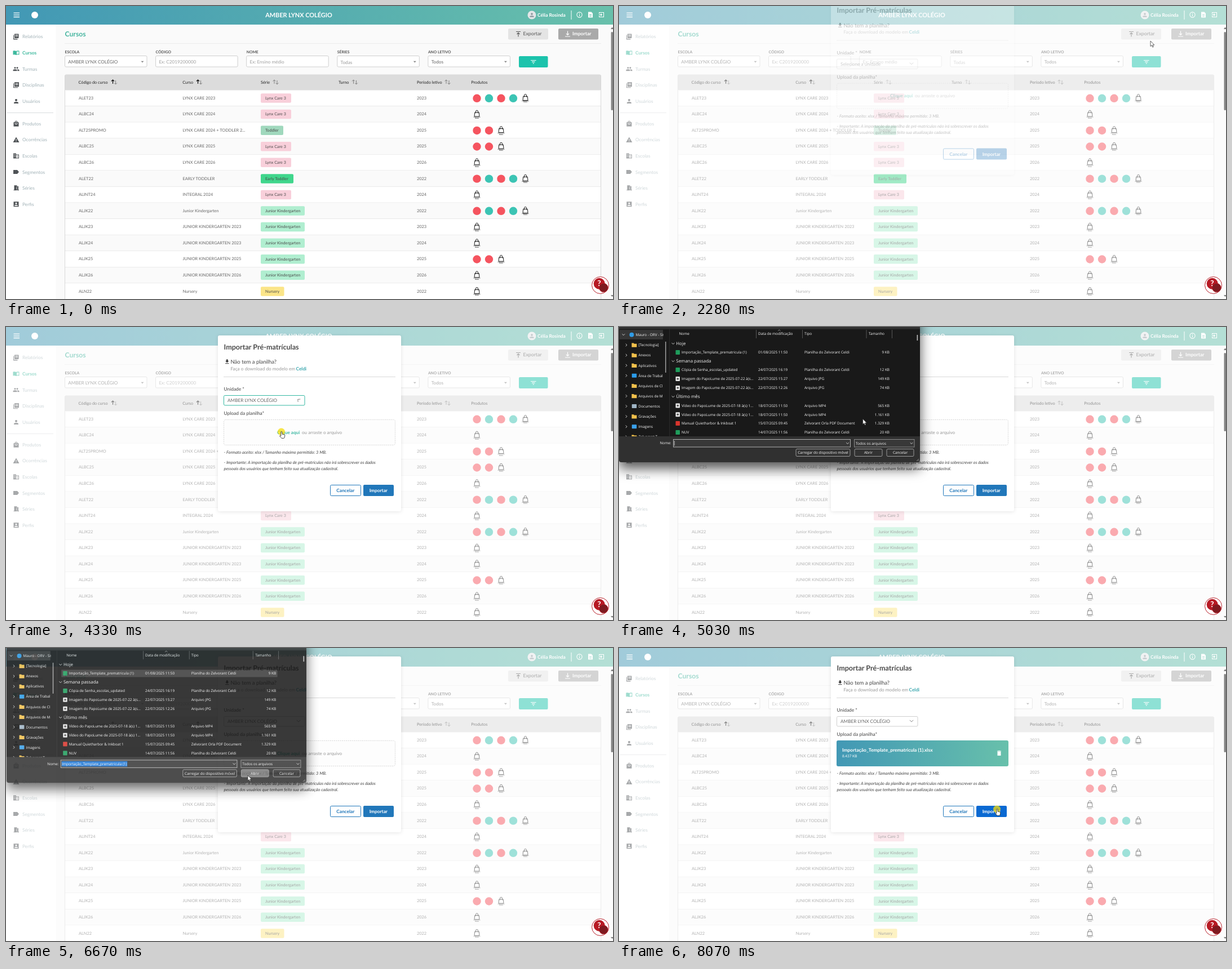
Write an HTML page that moves like this. It is 1077 by 520 pixels and loops after 8.13 s.

```html
<!DOCTYPE html>
<html lang="pt-BR">
<head>
<meta charset="utf-8">
<title>Importar</title>
<style>
html, body { margin: 0; width: 100%; height: 100%; overflow: hidden; background: #fafafa; }
svg { display: block; width: 1077px; height: 520px; }
text { font-family: Lato, "Open Sans", sans-serif; white-space: pre; text-rendering: geometricPrecision; }
#dialog text { font-family: "Open Sans", "Noto Sans", sans-serif; }
#modal { filter: drop-shadow(0 1px 3px rgba(0,0,0,.1)); }
#dialog { filter: drop-shadow(0 11px 11px rgba(0,0,0,.68)); }
</style>
</head>
<body>
<svg id="stage" viewBox="0 0 1077 520"></svg>
<script>
const LOOP = 8130;
const SCHOOL = 'AMBER LYNX COLÉGIO';
const FILE = 'Importação_Template_prematricula (1)';
const PICK = 'Selecione a unidade';

// Drawing helpers: text is placed by the middle of its capitals.
const text = (x, y, s, size, fill, extra = '') =>
  `<text x="${x}" y="${(y + size * .36).toFixed(2)}" font-size="${size}" fill="${fill}" ${extra}>${s}</text>`;
const BOLD = 'font-weight="700"', MID = 'text-anchor="middle"', END = 'text-anchor="end"', ITALIC = 'font-style="italic"';
const rect = (x, y, w, h, fill, extra = '') =>
  `<rect x="${x}" y="${y}" width="${w}" height="${h}" fill="${fill}" ${extra}/>`;
const circle = (x, y, r, fill, extra = '') => `<circle cx="${x}" cy="${y}" r="${r}" fill="${fill}" ${extra}/>`;
const line = (d, stroke, width = 1, extra = '') =>
  `<path d="${d}" fill="none" stroke="${stroke}" stroke-width="${width}" ${extra}/>`;
const group = (id, body, extra = '') => `<g id="${id}" ${extra}>${body}</g>`;
const at = (x, y, body, scale = 1) => `<g transform="translate(${x} ${y}) scale(${scale})">${body}</g>`;

// Icons live in a 24-unit box.
const ICONS = {
  report: 'M6 2h15v15H6zM9 5v2h9V5zM9 9v2h9V9zM2 6h2v13h13v3H2z',
  book: 'M1 5q6-2 11 1v14q-5-3-11-1zM12 6q5-3 11-1v14q-6-2-11 1zM14 8v9q4-1 7-1V7q-4 0-7 1z',
  people: 'M8 5a3 3 0 1 0 .01 0zM16 5a3 3 0 1 0 .01 0zM1 19v-2.500q0-3.500 7-3.500t7 3.500V19zM17 19v-3l-2-3q8 0 8 3.500V19z',
  layers: 'M6 2h16v16H6zM9 6v2h10V6zM9 10v2h10v-2zM2 6h2v14h14v2H2z',
  person: 'M12 4a4 4 0 1 0 .01 0zM4 20v-2q0-4 8-4t8 4v2z',
  bag: 'M3 7h4q0-5 5-5t5 5h4v15H3zM9 7h6q0-3-3-3t-3 3zM7 10q0 5 5 5t5-5h-2q0 3-3 3t-3-3z',
  warn: 'M12 2L1 21h22zM11 9v6h2V9zM11 17v2h2v-2z',
  building: 'M2 3h10v4h10v14H2zM4 6v2h2V6zM8 6v2h2V6zM4 10v2h2v-2zM8 10v2h2v-2zM4 14v2h2v-2zM8 14v2h2v-2zM12 9v10h8V9zM15 11v2h3v-2zM15 15v2h3v-2z',
  tag: 'M2 5h14l6 7-6 7H2z',
  door: 'M5 2h10v18H3v-2h2zM12 11v2h2v-2zM16 5h4v13h2v2h-6z',
  badge: 'M3 3h18v18H3zM12 6a3 3 0 1 0 .01 0zM6 18h12q0-4-6-4t-6 4z',
  file: 'M4 2h11l5 5v15H4zM8 11v2h8v-2zM8 16v2h8v-2z',
  exit: 'M3 3h18v18H3v-6h2v4h14V5H5v4H3zM10 7l5 5-5 5-1.500-1.500 2.500-2.500H3v-2h8L8.500 8.500z',
  trash: 'M6 7h12v14H6zM5 4h4l1-1h4l1 1h4v2H5z',
  down: 'M9 3h6v6h4l-7 7-7-7h4zM5 18h14v2H5z'
};
const icon = (name, x, y, size, fill) =>
  at(x - size / 2, y - size / 2, `<path d="${ICONS[name]}" fill="${fill}" fill-rule="evenodd"/>`, size / 24);
const chevron = (x, y, r, stroke, width = 1) => line(`M${x - r} ${y - r / 2}l${r} ${r}l${r} ${-r}`, stroke, width);
const caret = (x, y) => `<path d="M${x - 2.5} ${y - 1}h5l-2.500 2.700z" fill="#888"/>`;

function header() {
  return rect(0, 0, 1077, 33, 'url(#brand)') +
    line('M13.500 12.300h10.500m-10.500 3.600h10.500m-10.500 3.600h10.500', '#fff', 1.3) +
    circle(51, 16, 6, '#fff') +
    text(519.5, 15.6, SCHOOL, 10.9, '#fff', `${BOLD} ${MID}`) +
    circle(933, 16, 7.5, '#e4e6e8') + icon('person', 933, 16, 11, '#8f9aa0') +
    text(943, 15.6, 'Célia Rosinda', 8.4, '#fff', BOLD) +
    line('M1003 8v16', '#fff') + circle(1017.5, 15.5, 4.6, 'none', 'stroke="#fff" stroke-width="1.1"') +
    line('M1017.500 15v3m0-5.200v1.100', '#fff', 1.1) +
    icon('file', 1037, 15.5, 12, '#fff') + icon('exit', 1056.5, 15.5, 12, '#fff');
}

function sidebar() {
  const items = [['Relatórios', 'report'], ['Cursos', 'book'], ['Turmas', 'people'], ['Disciplinas', 'layers'], ['Usuários', 'person'],
    ['Produtos', 'bag'], ['Ocorrências', 'warn'], ['Escolas', 'building'], ['Segmentos', 'tag'], ['Séries', 'door'], ['Perfis', 'badge']];
  return rect(0, 33, 88.5, 487, '#fff') + line('M2 189.500h82', '#d9dcde') + items.map(([label, name], i) => {
    const y = 54.5 + i * 28.6 + (i > 4 ? 11.3 : 0), on = i === 1;
    return icon(name, 18, y, 12, on ? '#3fb99e' : '#4f5356') +
      text(29, y, label, 8.3, on ? '#3fb99e' : '#a3b3b8', on ? BOLD : '');
  }).join('');
}

function filters() {
  const fields = [['ESCOLA', SCHOOL, 1, '#666'], ['CÓDIGO', 'Ex: C2019200000', 0, '#a0a0a0'],
    ['NOME', 'Ex: Ensino médio', 0, '#a0a0a0'], ['SÉRIES', 'Todas', 1, '#999'], ['ANO LETIVO', 'Todos', 1, '#666']];
  return text(104.5, 49.5, 'Cursos', 12.2, '#45b59f', BOLD) + line('M104 66.500h952', '#ececec') +
    rect(891, 40, 71, 19.5, '#e4e4e4', 'rx="2"') + line('M905 45.500h8m-4 9v-7m-2.500 2.500l2.500-2.500l2.500 2.500', '#555', 1.1) +
    text(917.5, 49.3, 'Exportar', 8.7, '#555') +
    rect(980, 40, 71, 19.5, '#a9a9a9', 'rx="2" id="importTop"') +
    line('M992 54h9m-4.500-9.500v7m-2.500-2.500l2.500 2.500l2.500-2.500', '#fff', 1.2) + text(1005, 49.3, 'Importar', 8.6, '#fff', BOLD) +
    fields.map(([label, value, list, color], i) => {
      const x = 104.5 + i * 161.1;
      return text(x, 81.8, label, 6.8, '#555', BOLD) + rect(x, 88.5, 145.5, 19.5, '#fff', 'rx="2" stroke="#cfcfcf"') +
        text(x + 5.8, i === 3 ? 100 : 98.6, value, 8.2, color) + (list ? caret(x + 137.5, 98.8) : '');
    }).join('') +
    rect(910, 89, 51.5, 20, '#1cc3ac', 'rx="2"') + line('M931 96.500h9.500m-7.500 2.700h5.500m-3.700 2.700h2', '#fff', 1.2);
}

const bagMark = (x, y) => at(x, y,
  line('M-3.800 -3h7.600l.7 7.200h-9zM-2 -1.500v-3.200q0-2 2-2t2 2v3.200', '#1c1c1c', 1) + line('M-6.300 5.300h12.600', '#444', .6) +
  text(0, 7, 'Store', 3, '#222', `${BOLD} ${MID}`));

function table() {
  const chips = {
    L: ['Lynx Care 3', 54, '#f8cfda'], T: ['Toddler', 40, '#a0d8bd'], E: ['Early Toddler', 58, '#40d68c'],
    J: ['Junior Kindergarten', 78, '#b0eed0'], N: ['Nursery', 41.5, '#fbe588']
  };
  const rows = ['ET23|LYNX CARE 2023|L|2023|rgrgb', 'BC24|LYNX CARE 2024|L|2024|b', 'T25PROMO|LYNX CARE 2024 + TODDLER 2...|T|2025|rrb',
    'BC25|LYNX CARE 2025|L|2025|rrb', 'BC26|LYNX CARE 2026|L|2026|b', 'ET22|EARLY TODDLER|E|2022|rgrgb',
    'INT24|INTEGRAL 2024|L|2024|b', 'JK22|Junior Kindergarten|J|2022|rgrgb', 'JK23|JUNIOR KINDERGARTEN 2023|J|2023|b',
    'JK24|JUNIOR KINDERGARTEN 2023|J|2024|b', 'JK25|JUNIOR KINDERGARTEN 2025|J|2025|rrb',
    'JK26|JUNIOR KINDERGARTEN 2026|J|2026|b', 'N22|Nursery|N|2022|b'];
  const heads = [['Código do curso', 128.5, 192], ['Curso', 313.3, 343], ['Série', 452, 478.5], ['Turno', 590, 619],
    ['Período letivo', 729, 783.5], ['Produtos', 825.3]];
  const body = rows.map((row, i) => {
    const [code, course, kind, year, marks] = row.split('|'), y = 163.3 + i * 28.57;
    const [label, width, color] = chips[kind];
    return rect(104.5, y - 14.1, 951, 28.6, i % 2 ? '#fafafa' : '#fff') + line(`M104.500 ${y + 14.5}h951`, '#dadada') +
      text(129, y - .2, 'AL' + code, 7.4, '#666') + text(313.4, y - .2, course, 7.4, '#666') +
      rect(452, y - 8, width, 16.5, color, 'rx="2"') + text(460, y, label, 7.2, '#4a4a4a') +
      text(729, y - .2, year, 7.4, '#666') +
      [...marks].map((m, k) => {
        const x = 835.5 + k * 21.5;
        return m === 'b' ? bagMark(x, y) : circle(x, y + .5, 7.2, m === 'r' ? '#f5545f' : '#3cc4b4');
      }).join('');
  }).join('');
  return body + rect(104.5, 121.5, 951, 28, '#dcdcdc', 'rx="2"') + line('M104.500 123v397m951-397v397', '#d8d8d8') +
    heads.map(([label, x, sort], i) => text(x, 135.2, label, 7.3, '#222') + (sort ? at(sort, 135,
      line('M-2.500 3v-7m-2.500 2.500l2.500-2.500l2.500 2.500', i < 2 ? '#111' : '#777', i < 2 ? 1.2 : .9) +
      line('M2.500 -3v7m-2.500-2.500l2.500 2.500l2.500-2.500', '#777', .9)) : '')).join('');
}

function modal() {
  const bin = rect(386, 164, 305, 46, 'url(#brand)', 'rx="3"') + text(396, 181, FILE + '.xlsx', 8.45, '#fff', BOLD) +
    text(396, 191.5, '8.437 KB', 6.4, '#fff') + icon('trash', 674.5, 186.5, 12, '#fff');
  const drop = rect(386.5, 164.5, 304, 45, '#fdfdfd', 'rx="3" stroke="#d5d5d5" stroke-dasharray="2 1.500"') +
    text(481, 186.8, 'Clique aqui', 8.1, '#3fb9a4', BOLD) + text(525, 186.8, 'ou arraste o arquivo', 8.15, '#999');
  return rect(376, 15, 325, 312, '#fff', 'rx="3"') + text(386.5, 35, 'Importar Pré-matrículas', 12.6, '#4a4a4a', BOLD) +
    icon('down', 392.3, 61.5, 11, '#333') + text(398.5, 61.8, 'Não tem a planilha?', 9.5, '#444') +
    text(398.5, 73.8, 'Faça o download do modelo em', 8.25, '#999') + text(514.5, 73.8, 'Celdi', 8.3, '#3fa9b0', BOLD) +
    line('M386 88.500h305', '#d9d9d9') + text(386.5, 110, 'Unidade *', 8.4, '#444') +
    rect(386.5, 121.5, 143.5, 17.5, '#fff', 'rx="2" id="select"') + text(393, 130.2, PICK, 8.2, '#666', 'id="choice"') +
    group('arrow', chevron(0, 0, 3.2, '#888')) + text(386.5, 153, 'Upload da planilha*', 8.45, '#444') +
    group('drop', drop) + group('bin', bin) +
    text(386.5, 222.5, '- Formato aceito: xlsx / Tamanho máximo permitido: 3 MB.', 7.5, '#444', ITALIC) +
    text(386.5, 240.5, '- Importante: A importação da planilha de pré-matrículas não irá sobrescrever os dados', 7.5, '#444', ITALIC) +
    text(386.5, 251.5, 'pessoais dos usuários que tenham feito sua atualização cadastral.', 7.5, '#444', ITALIC) +
    rect(575.5, 280.5, 54, 19, '#fff', 'rx="2" stroke="#2177ba"') + text(602.3, 290.2, 'Cancelar', 8.3, '#2177ba', `${BOLD} ${MID}`) +
    rect(634, 280, 54, 20, '#2177ba', 'rx="2" id="importBtn"') + text(660.8, 290.2, 'Importar', 8.3, '#fff', `${BOLD} ${MID}`);
}

const OPTIONS = [PICK, PICK, PICK, SCHOOL, SCHOOL + ' II'];
const optionY = i => 142.5 + i * 15.3;
const dropdown = () => rect(386.5, 142.5, 143.5, 76.5, '#fff', 'stroke="#666"') + rect(387, 0, 142.5, 15.3, '#6b6b6b', 'id="hover"') +
  OPTIONS.map((s, i) => text(393, optionY(i) + 7.8, s, 8.2, '#555', 'class="option"')).join('');

function dialog() {
  const ink = '#f6f6f6', size = 6.45;
  const say = (x, y, s, extra) => text(x, y, s, size, ink, extra);
  const folder = (x, y) => `<path d="M${x - 4.5} ${y - 3.5}h3.500l1 1.200h4.500v6h-9z" fill="#f0c04c"/>`;
  const places = ['[Tecnologia]', 'Anexos', 'Aplicativos', 'Área de Trabal', 'Arquivos de Cl', 'Arquivos de M', 'Documentos',
    'Gravações', 'Imagens', 'Zelvorant T'];
  const special = { 3: '#2b9be8', 6: '#9fb4c4', 8: '#3aa0ea' };
  const sheet = 'Planilha do Zelvorant Celdi';
  const files = [
    [45, 's', FILE, '01/08/2025 11:50', sheet, '9 KB'], [76, 's', 'Cópia de Senha_escolas_updated', '24/07/2025 16:19', sheet, '12 KB'],
    [92, 'm', 'Imagem do PapoLume de 2025-07-22 à(s...', '22/07/2025 15:27', 'Arquivo JPG', '149 KB'],
    [108, 'm', 'Imagem do PapoLume de 2025-07-22 à(s...', '22/07/2025 12:26', 'Arquivo JPG', '74 KB'],
    [139.5, 'm', 'Vídeo do PapoLume de 2025-07-18 à(s) 1...', '18/07/2025 11:50', 'Arquivo MP4', '565 KB'],
    [155.2, 'm', 'Vídeo do PapoLume de 2025-07-18 à(s) 1...', '18/07/2025 11:50', 'Arquivo MP4', '1.161 KB'],
    [171, 'p', 'Manual Quietharbor &amp; Inkboat 1', '15/07/2025 09:45', 'Zelvorant Orla PDF Document', '1.329 KB'],
    [187, 's', 'NUV', '14/07/2025 11:56', sheet, '20 KB']];
  const tint = { s: '#1f9d5c', m: '#e8e8e8', p: '#d8342c' };
  const button = (x, w, s, id) => rect(x, 216.5, w, 13, '#333', `rx="2" stroke="#9a9a9a" ${id}`) + say(x + w / 2, 223, s, MID);
  const nav = rect(1, 5, 77, 17, '#363636') + chevron(8, 13.5, 2.4, ink, .8) + circle(22.5, 13.7, 4, '#2f9be6') + say(29.5, 13.5, 'Mauro - ORV - Sist') +
    places.map((s, i) => {
      const y = 32 + i * 18.1;
      return line(`M11.800 ${y - 2.3}l2.300 2.300l-2.300 2.300`, ink, .8) +
        (special[i] ? rect(22.8, y - 3.5, 8.5, 7, special[i], 'rx=".8"') : folder(27, y)) + say(34.5, y, s);
    }).join('');
  return rect(0, -30, 534, 270, '#303030', 'rx="4"') + rect(0, 4, 534, 190, '#191919') +
    `<g clip-path="url(#navClip)">${nav}</g>` + rect(82, 26, 1.5, 55, '#a0a0a0') + line('M89.500 4v190', '#2a2a2a') +
    line('M243.500 5v15m82-15v15m113.500-15v15m45.500-15v15', '#666', .8) + line('M282 7l2.300-2l2.300 2', '#bbb', .7) +
    say(106.5, 12, 'Nome') + say(247, 12, 'Data de modificação') + say(329, 12, 'Tipo') + say(443, 12, 'Tamanho') +
    [['Hoje', 29.3], ['Semana passada', 60.5], ['Último mês', 123.5]].map(([s, y]) =>
      chevron(96, y, 2.4, ink, .8) + text(101.3, y, s, 7.9, ink)).join('') +
    rect(97.5, 38.5, 385, 13, '#4b4b4b', 'id="picked"') +
    files.map(([y, kind, name, date, type, kb]) => rect(100.5, y - 4, 7.5, 8, tint[kind], 'rx=".8"') +
      (kind === 'm' ? circle(104.3, y, 1.8, '#555') : '') +
      say(111, y, name) + say(247, y, date) + say(329, y, type) + say(480, y, kb, END)).join('') +
    rect(528.6, 14, 1.6, 10, '#c0c0c0') + say(72.5, 206, 'Nome:') +
    rect(96.5, 199.5, 314, 13.5, '#383838', 'stroke="#b0b0b0"') + rect(98, 201.5, 117, 9.5, '#1f78d6', 'id="marked"') +
    say(98.5, 206.2, FILE, 'id="fileName"') + line('M98.200 202v8.500', '#fff', .7, 'id="textCaret"') + chevron(405.5, 206.3, 2.3, ink, .8) +
    rect(417.5, 199.5, 106.5, 13.5, '#383838', 'stroke="#8a8a8a"') + say(420, 206.2, 'Todos os arquivos') + chevron(519, 206.3, 2.3, ink, .8) +
    button(314, 96, 'Carregar do dispositivo móvel', '') + button(418, 49, 'Abrir', 'id="open"') + button(475, 48, 'Cancelar', '') +
    line('M528 238l4-4m-1.500 4l2-2', '#aaa', .8);
}

const floating = () => rect(1073.5, 46, 3.5, 139, '#858585', 'rx="1.500"') +
  '<path d="M1073 41l2.500-3.500l2.500 3.500zM1073 513l2.500 3l2.500-3z" fill="#777"/>' +
  circle(1054.5, 495.5, 15, '#fff', 'stroke="#b8202a"') +
  circle(1052.7, 492.7, 10, '#b71a24') + circle(1060.3, 500, 7.8, '#7e1a20', 'stroke="#b71a24" stroke-width=".8"') +
  text(1052.5, 491.8, '?', 14, '#fff', `${BOLD} ${MID}`);

const stage = document.getElementById('stage');
stage.innerHTML = `<defs>
  <linearGradient id="brand"><stop stop-color="#4298b5"/><stop offset="1" stop-color="#68c0ab"/></linearGradient>
  <clipPath id="navClip"><path d="M0 4h79v190H0z"/></clipPath></defs>` +
  rect(0, 0, 1077, 520, '#fafafa') + header() + sidebar() + filters() + table() +
  rect(0, 0, 1077, 520, '#fff', 'id="veil"') + group('modal', modal()) + group('list', dropdown()) +
  group('dialog', dialog()) + floating() +
  group('cursor', circle(-.5, 0, 6.5, '#f4dc0c', 'id="flash"') +
    '<path id="pointer" d="M0 0V9.500L2.200 7.500L3.800 11L5.300 10.300L3.800 7H6.800z" fill="#fff" stroke="#222" stroke-width=".7"/>' +
    '<path id="hand" d="M-1.200 6V.8a1.100 1.100 0 0 1 2.200 0V4.200l4 .9q1 .4 .8 1.600l-.7 3.400q-.3 1.400-1.600 1.400H.8q-1 0-1.600-.9L-3.600 7.400q.8-1.200 2.400 .1z" fill="#fff" stroke="#222" stroke-width=".8"/>');

const el = {};
for (const node of stage.querySelectorAll('[id]')) el[node.id] = node;
const options = [...stage.querySelectorAll('.option')];

const ramp = (t, a, b) => Math.min(1, Math.max(0, (t - a) / (b - a)));
const smooth = p => p * p * (3 - 2 * p);
const show = (id, on) => el[id].setAttribute('display', on ? 'inline' : 'none');
const set = (id, name, value) => el[id].setAttribute(name, value);

// Cursor stops: time, x, y.
const PATH = [[290, 640, 524], [1070, 1020, 50], [2120, 1020, 50], [2780, 505, 131], [3000, 505, 131], [3100, 497, 142],
  [3660, 455, 197], [3980, 455, 197], [4280, 489, 186], [4850, 489, 186], [5560, 141, 45], [5830, 141, 45],
  [6400, 429, 226], [6720, 429, 226], [7250, 612, 304], [7470, 612, 304], [7850, 671, 286]];
const CLICKS = [1985, 2890, 3940, 4300, 5740, 6480, 8030];

function cursorAt(t) {
  const i = PATH.findIndex(stop => stop[0] > t);
  if (i < 1) return (i ? PATH[PATH.length - 1] : PATH[0]).slice(1);
  const [t0, x0, y0] = PATH[i - 1], [t1, x1, y1] = PATH[i], p = smooth(ramp(t, t0, t1));
  return [x0 + (x1 - x0) * p, y0 + (y1 - y0) * p];
}

function render(t) {
  const [x, y] = cursorAt(t);
  const within = (a, b) => t >= a && t < b;
  const overTop = x > 980 && y < 60 && t < 2200, overImport = t > 7500 && x > 634 && y < 301;
  const hand = overTop || overImport || within(4180, 4860);
  show('cursor', t >= 290);
  set('cursor', 'transform', `translate(${x} ${y})`);
  show('hand', hand);
  show('pointer', !hand);
  const click = CLICKS.find(c => within(c, c + 180));
  set('flash', 'opacity', click === undefined ? 0 : .75 * (1 - ramp(t, click + 80, click + 180)));

  set('importTop', 'fill', overTop ? '#989898' : '#a9a9a9');
  set('veil', 'opacity', .5 * ramp(t, 2120, 2270));
  const enter = smooth(ramp(t, 2180, 2450));
  set('modal', 'opacity', enter);
  set('modal', 'transform', `translate(0 ${-40 * (1 - enter)})`);

  const focus = within(2900, 4400), turn = 180 * (ramp(t, 2900, 3040) - ramp(t, 4290, 4440));
  set('select', 'stroke', focus ? '#35b8a2' : '#cfcfcf');
  set('arrow', 'transform', `translate(519 129.500) rotate(${turn})`);
  el.choice.textContent = t < 3980 ? PICK : SCHOOL;
  show('list', within(2960, 3980));
  const active = y < optionY(0) ? 1 : Math.min(4, Math.floor((y - optionY(0)) / 15.3));
  set('hover', 'y', optionY(active));
  options.forEach((o, i) => o.setAttribute('fill', i === active ? '#fff' : '#555'));

  const loaded = t >= 6900;
  show('drop', !loaded);
  show('bin', loaded);
  set('importBtn', 'fill', overImport ? '#0a69d2' : '#2177ba');

  const visible = ramp(t, 4810, 4980) * (1 - ramp(t, 6650, 6800)), scale = 1 - .03 * (1 - visible);
  show('dialog', visible > 0);
  set('dialog', 'opacity', visible);
  set('dialog', 'transform', `translate(270 60) scale(${scale}) translate(-270 -60)`);
  const chosen = t >= 5740, opening = t >= 6480;
  show('picked', chosen || within(5520, 5740));
  set('picked', 'fill', opening || !chosen ? '#3a3a3a' : '#4b4b4b');
  set('picked', 'stroke', chosen && !opening ? '#999' : 'none');
  show('fileName', chosen);
  show('textCaret', !opening);
  show('marked', opening);
  set('open', 'fill', opening ? '#777' : t > 6300 ? '#484848' : '#333');
  set('open', 'stroke', chosen && !opening ? '#fff' : '#9a9a9a');
}

const start = performance.now();
(function frame() {
  render((performance.now() - start) % LOOP);
  requestAnimationFrame(frame);
})();
</script>
</body>
</html>
```
